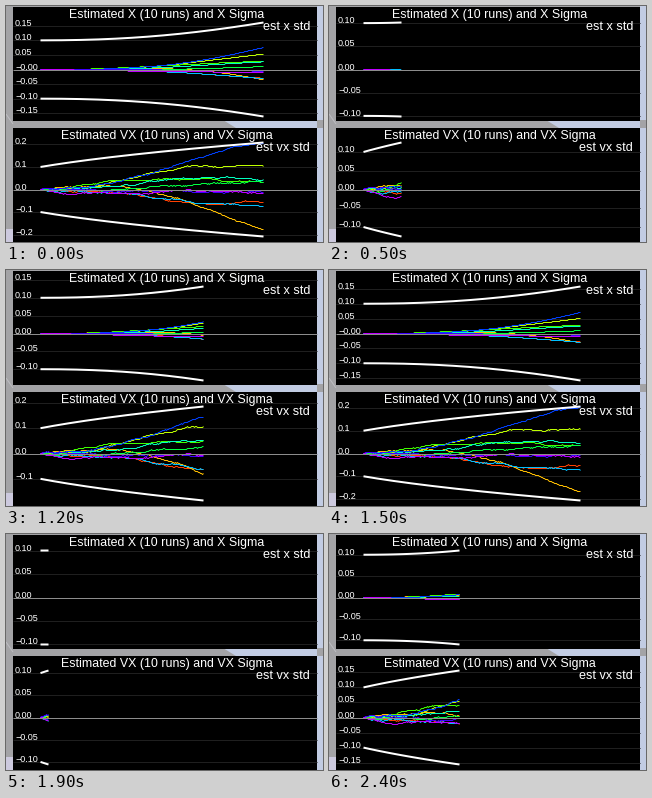
A matplotlib script for the animation above (2.5 s loop, 317 by 236 pixels).

```python
import colorsys

import matplotlib.pyplot as plt
import numpy as np
from matplotlib.animation import FuncAnimation
from matplotlib.patches import Polygon, Rectangle

W, H = 317, 236
LEFT, RIGHT, X0 = 7, 311, 34
FRAMES, SPEED = 25, 17.9
SPAN = 280           # longest run in pixels
DT = 0.0039          # seconds per pixel of run
REACH = 47           # pixels from the zero line to the largest value
ABOVE, BELOW = 55.6, 49
FONT = "Liberation Sans"

rng = np.random.default_rng(7)
d = np.arange(SPAN + 1)
u = d / SPAN

# each run drifts to a final velocity between two moments: (end, start, stop)
DRIFTS = [
    (-0.060, 0.15, 0.6),
    (-0.220, 0.20, 1.0),
    (0.090, 0.05, 0.6),
    (0.028, 0.00, 0.3),
    (0.024, 0.10, 0.5),
    (0.035, 0.00, 0.6),
    (-0.082, 0.10, 1.0),
    (0.225, 0.00, 1.0),
    (-0.008, 0.00, 0.3),
    (-0.018, 0.00, 0.12),
]
COLORS = [colorsys.hsv_to_rgb((i + 0.5) / 12, 1, 1)
          for i in range(len(DRIFTS))]


def velocity(end, start, stop):
    t = np.clip((u - start) / (stop - start), 0, 1)
    walk = np.cumsum(rng.normal(0, 0.0011, d.size))
    walk -= walk[0] + u * (walk[-1] - walk[0])
    return end * np.sin(t * np.pi / 2) ** 2 + walk


def integrate(v):
    return np.concatenate([[0], np.cumsum((v[1:] + v[:-1]) / 2) * DT])


vel = [velocity(*drift) for drift in DRIFTS]
pos = [integrate(v) for v in vel]

# spread of a random-walk velocity and of its integral
P0, Q = 0.01, 1.5e-4
sigma_v = np.sqrt(P0 + Q * d)
sigma_x = np.sqrt(P0 + P0 * (DT * d) ** 2 + Q * DT ** 2 * d ** 3 / 3)

fig = plt.figure(figsize=(W / 72, H / 72), dpi=72)
ax = fig.add_axes([0, 0, 1, 1])


def text(x, y, s, size, ha):
    ax.text(x, y, s, size=size, ha=ha, va="baseline", color="white",
            family=FONT, zorder=6)


def line(x, y, color, lw, z):
    ax.plot(x, y, color=color, lw=lw, zorder=z, solid_capstyle="butt")


def backdrop():
    fig.set_facecolor((0.64, 0.64, 0.65))
    wall = [(217, 114), (230, 122), (W, 122), (W, H), (RIGHT, H),
            (RIGHT, 0), (W, 0), (W, 114)]
    ax.add_patch(Polygon(wall, color=(0.76, 0.8, 0.89), lw=0, zorder=0))
    ax.add_patch(Rectangle((0, 223), LEFT, H - 223, color=(0.8, 0.79, 0.87),
                           lw=0, zorder=0))
    line([0, LEFT], [108, 118], (0.74, 0.74, 0.76), 1, 0)


def grid(zero, scale, top, signed_zero):
    step, digits = (0.1, 1) if top > 0.17 else (0.05, 2)
    negative_zero = signed_zero and 3 * step * scale < BELOW
    for n in range(-4, 5):
        rise = n * step * scale
        if not -BELOW < rise < ABOVE:
            continue
        y = zero - rise
        line([LEFT, RIGHT], [y, y], "0.12" if n else "0.55", 1, 2 if n else 4)
        minus = n < 0 or (n == 0 and negative_zero)
        label = f"{abs(n * step):.{digits}f}"
        text(9, y, "\u2212" * minus + label, 9, "left")


def panel(y, zero, runs, sigma, end, name, signed_zero=False):
    ax.add_patch(Rectangle((LEFT, y + 1), RIGHT - LEFT, 114, color="black",
                           lw=0, zorder=1))
    n = int(round(end)) + 1
    top = max(sigma[n - 1], max(np.abs(r[:n]).max() for r in runs))
    scale = REACH / top
    grid(zero, scale, top, signed_zero)
    x = X0 + d[:n] + 0.5
    for run, color in zip(runs, COLORS):
        # whole pixel rows keep the thin curves crisp
        line(x, np.floor(zero - run[:n] * scale) + 0.5, color, 1, 3)
    for sign in (1, -1):
        line(x, zero - sign * sigma[:n] * scale, "white", 2, 5)
    big = name.upper()
    text(161, y + 12.2, f"Estimated {big} (10 runs) and {big} Sigma", 12.4,
         "center")
    text(304, y + 24.2, f"est {name} std", 12.6, "right")


def progress(i):
    if i < 3:
        return 223 + SPEED * i
    if i < 19:
        return 38 + SPEED * (i - 5)
    return 43 + 17.5 * (i - 21)


def draw(i):
    ax.clear()
    backdrop()
    end = progress(i)
    panel(0, 63.5, pos, sigma_x, end, "x", signed_zero=True)
    panel(120.5, 183.5, vel, sigma_v, end, "vx")
    ax.set_xlim(0, W)
    ax.set_ylim(H, 0)
    ax.axis("off")
    return []


anim = FuncAnimation(fig, draw, frames=FRAMES, interval=100, repeat=True,
                     repeat_delay=0, init_func=lambda: [], blit=False)
plt.show()
```
